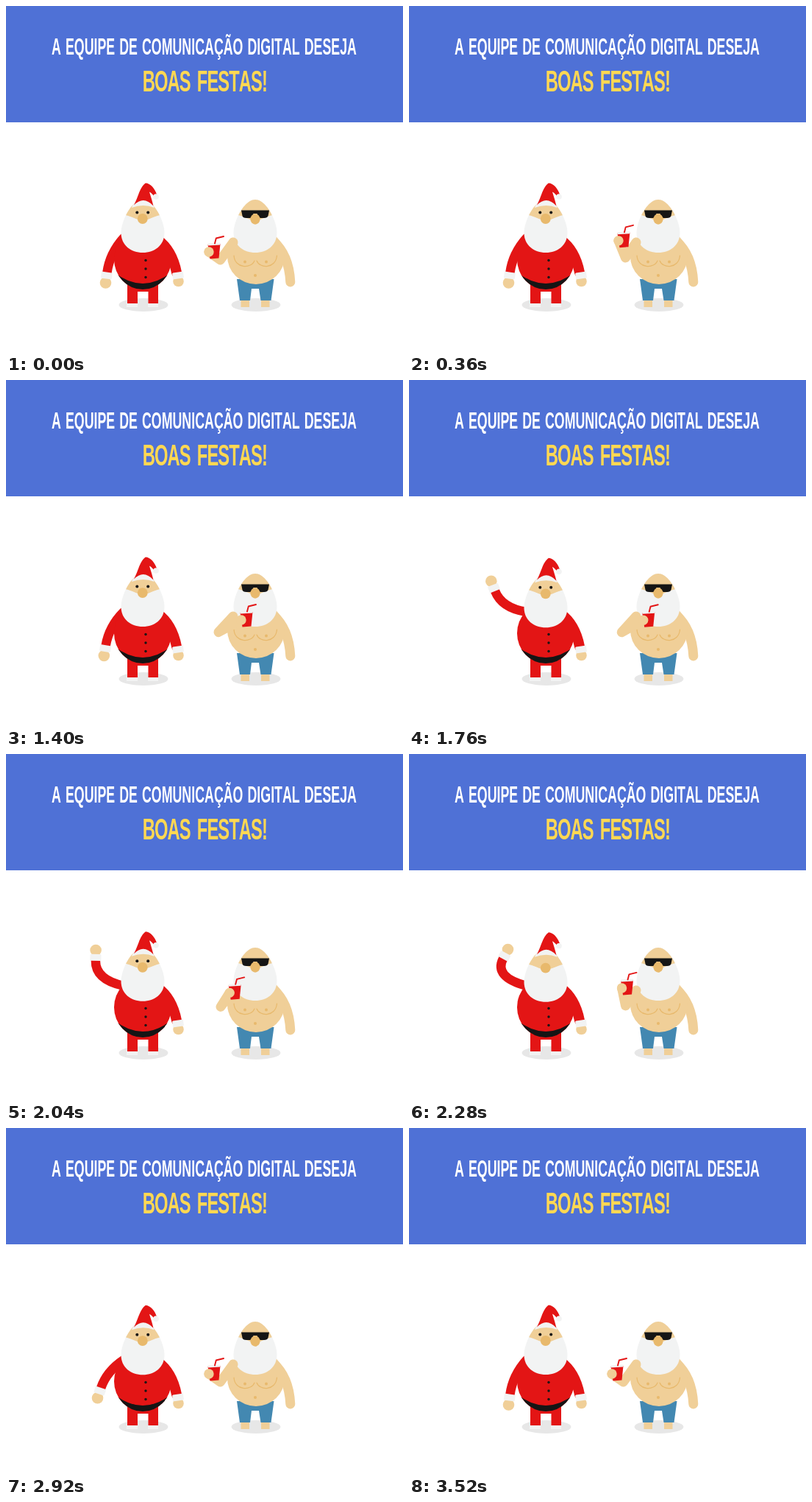
Write an HTML page that moves like this. It is 540 px wide and 470 px high and loops after 4.04 s.

```html
<!DOCTYPE html>
<html lang="pt">
<head>
<meta charset="utf-8">
<title>Boas festas</title>
<style>
  html, body { margin: 0; width: 100%; height: 100%; overflow: hidden; background: #fff; }
  svg { display: block; }
  text { font-family: "Liberation Sans", Arial, sans-serif; font-weight: 700; font-kerning: none; text-anchor: middle; }
  .skin { fill: #f0cf98; }
  .nose { fill: #e8b96c; }
  .red { fill: #e31515; }
  .white { fill: #f2f3f3; }
  .black { fill: #151515; }
  .blue { fill: #4388b1; }
  .shadow { fill: #e7e7e7; }
  .limb { fill: none; stroke-linecap: round; stroke-linejoin: round; }
  .sleeve { stroke: #e31515; }
  .bare { stroke: #f0cf98; }
  .line { fill: none; stroke: #e8b96c; stroke-width: 1.2; stroke-linecap: round; }
</style>
</head>
<body>
<svg width="540" height="470" viewBox="0 0 540 470">
  <defs>
    <path id="egg" d="M0 263C15 263 29.500 292 29.500 308C29.500 325 16 335 0 335C-16 335 -29.500 325 -29.500 308C-29.500 292 -15 263 0 263Z"/>
    <clipPath id="face"><path d="M-36 255H36V281Q20 284 7 290H-7Q-20 284 -36 281Z"/></clipPath>
    <clipPath id="belly"><ellipse cx="186" cy="344" rx="39" ry="41"/></clipPath>
    <g id="head">
      <use href="#egg" class="white"/>
      <use href="#egg" class="skin" clip-path="url(#face)"/>
    </g>
  </defs>

  <rect width="540" height="158" fill="#4f71d6"/>
  <g transform="scale(.584 1)">
    <text x="461.500" y="66.500" font-size="30.500" word-spacing="1.800" fill="#fff">A EQUIPE DE COMUNICAÇÃO DIGITAL DESEJA</text>
    <text x="463" y="116" font-size="40.700" letter-spacing="-1.600" word-spacing="6" fill="#ffd852">BOAS FESTAS!</text>
  </g>

  <g id="santa">
    <ellipse class="shadow" cx="187" cy="406" rx="33.500" ry="9"/>
    <path class="white" d="M164 409V403H179V409ZM193 409V403H207V409Z"/>
    <path class="red" d="M165 376H207V404H193.500V388H179V404H165Z"/>
    <path class="limb sleeve" stroke-width="14" stroke-linecap="butt" d="M207 318Q226 332 232 362"/>
    <circle class="skin" cx="234.500" cy="374" r="7.300"/>
    <rect class="white" x="-7.500" y="-4.500" width="15" height="9" rx="1.500" transform="translate(234 366)rotate(-8)"/>
    <path id="arm" class="limb sleeve" stroke-width="12.500"/>
    <circle id="hand" class="skin" r="7.800"/>
    <rect id="cuff" class="white" x="-4.500" y="-7.500" width="9" height="15" rx="1.500"/>
    <g clip-path="url(#belly)">
      <rect class="red" x="146" y="300" width="82" height="88"/>
      <path class="black" d="M146 361Q166 377 186 377Q206 377 226 361V390H146Z"/>
    </g>
    <circle class="black" cx="190" cy="345.500" r="1.700"/>
    <circle class="black" cx="190" cy="357" r="1.700"/>
    <circle class="black" cx="190" cy="368.500" r="1.700"/>
    <g id="santaHead">
      <use href="#head" x="186"/>
      <path class="white" d="M171 274Q175 262 187 262Q198 262 201.500 274Q187 268 171 274Z"/>
      <path class="red" d="M174 270.500C180 259 182 246 190 240.500C197 241 203 249 205 256L202 259Q198 254 195 252.500C197 259 199 265 200.500 271.500Q187 257 174 270.500Z"/>
      <circle class="white" cx="204" cy="259" r="3.800"/>
      <g id="eyes" class="black">
        <circle cx="178.300" cy="280.500" r="2"/>
        <circle cx="193.200" cy="280.500" r="2"/>
      </g>
      <circle class="nose" cx="185.800" cy="289" r="6.900"/>
    </g>
  </g>

  <g id="bather">
    <ellipse class="shadow" cx="340" cy="406" rx="33.500" ry="9"/>
    <path class="skin" d="M319.500 409V398H331V409ZM347 409V398H358.500V409Z"/>
    <path class="blue" d="M314 371H364.500L360.500 400H346.500L344 384H334L332 400H318Z"/>
    <path class="limb bare" stroke-width="13" d="M363 319Q385 338 386.800 375"/>
    <ellipse class="skin" cx="340" cy="340" rx="39" ry="38"/>
    <path class="line" d="M310 339C311 357 334 357 338 346M341 346C345 357 367 357 368.500 339"/>
    <circle class="nose" cx="325" cy="347.500" r="2"/>
    <circle class="nose" cx="354" cy="347.500" r="2"/>
    <circle class="nose" cx="339" cy="366" r="2"/>
    <use href="#head" x="339"/>
    <path class="black" d="M320 277.500H358L356.500 285Q355.500 288 351 288H346Q342.500 287.500 341.500 282H336.500Q335.500 287.500 332 288H327Q322 288 321.500 285Z"/>
    <ellipse class="nose" cx="339" cy="289.500" rx="6.600" ry="7.200"/>
    <path id="bareArm" class="limb bare" stroke-width="13"/>
    <g id="cup">
      <path class="red" d="M-8.500 -9L8.500 -10L6.500 9.500L-5.500 10.500Z"/>
      <path class="white" d="M-8.500 -10.500L8.500 -11.500L8.300 -8.500L-8.300 -7.500Z"/>
      <path class="limb sleeve" stroke-width="1.900" d="M1 -10.500L2.800 -17.500L13 -20"/>
      <circle class="skin" cx="-7" cy="1" r="6.700"/>
    </g>
  </g>
</svg>
<script>
const LOOP = 4040, STEP = 40;
const el = id => document.getElementById(id);
const put = (id, name, value) => el(id).setAttribute(name, value);

// Eased progress from 0 to 1 between two times
function ease(t, from, to) {
  const k = Math.min(1, Math.max(0, (t - from) / (to - from)));
  return (1 - Math.cos(Math.PI * k)) / 2;
}

// Smooth curve through points placed at the given stops
function along(stops, points, p) {
  let x = 0, y = 0;
  stops.forEach((s, i) => {
    let w = 1;
    stops.forEach((q, j) => { if (j !== i) w *= (p - q) / (s - q); });
    x += w * points[i][0];
    y += w * points[i][1];
  });
  return [x, y];
}

const WAVE = [0, .45, .79, 1];
const HAND = [[135.5, 376], [102.5, 316], [112, 273], [134.5, 265.5]];
const BEND = [[141, 336], [131, 318], [126, 310], [115, 303]];
const SIP = [0, .4, .82, 1];
const CUP = [[283, 333], [297, 317], [316, 325], [327, 325]];
const ELBOW = [[291.5, 345], [294.5, 342], [291, 343.5], [289, 342.5]];
const BLINKS = [680, 2200, 3240], BLINK = 280;

function drawWave(t) {
  const raised = ease(t, 1350, 1940) - ease(t, 2600, 3000);
  const swing = t > 1960 && t < 2600 ? Math.sin(Math.PI * (t - 1960) / 320) ** 2 : 0;
  const p = raised - .2 * swing;
  const [hx, hy] = along(WAVE, HAND, p);
  const [bx, by] = along(WAVE, BEND, p);
  const turn = Math.atan2(hy - by, hx - bx);
  const cx = hx - 10 * Math.cos(turn), cy = hy - 10 * Math.sin(turn);
  const ex = cx - 4 * Math.cos(turn), ey = cy - 4 * Math.sin(turn);
  put('arm', 'd', `M160 315Q${bx} ${by} ${ex} ${ey}`);
  put('hand', 'transform', `translate(${hx} ${hy})`);
  put('cuff', 'transform', `translate(${cx} ${cy})rotate(${turn * 180 / Math.PI})`);
  put('santaHead', 'transform', `translate(0 ${1.7 * raised * (1 - swing)})`);
}

function drawSip(t) {
  const p = ease(t, 80, 900) - ease(t, 1665, 2740);
  const [x, y] = along(SIP, CUP, p);
  const [ex, ey] = along(SIP, ELBOW, p);
  put('bareArm', 'd', `M309 321L${ex} ${ey}L${x - 7} ${y + 1}`);
  put('cup', 'transform', `translate(${x} ${y})`);
}

function draw(now) {
  const t = Math.floor(now % LOOP / STEP) * STEP;
  drawWave(t);
  drawSip(t);
  const shut = BLINKS.some(b => t >= b && t < b + BLINK);
  put('eyes', 'visibility', shut ? 'hidden' : 'visible');
}

const start = performance.now();
function tick() {
  draw(performance.now() - start);
  requestAnimationFrame(tick);
}
tick();
</script>
</body>
</html>
```
